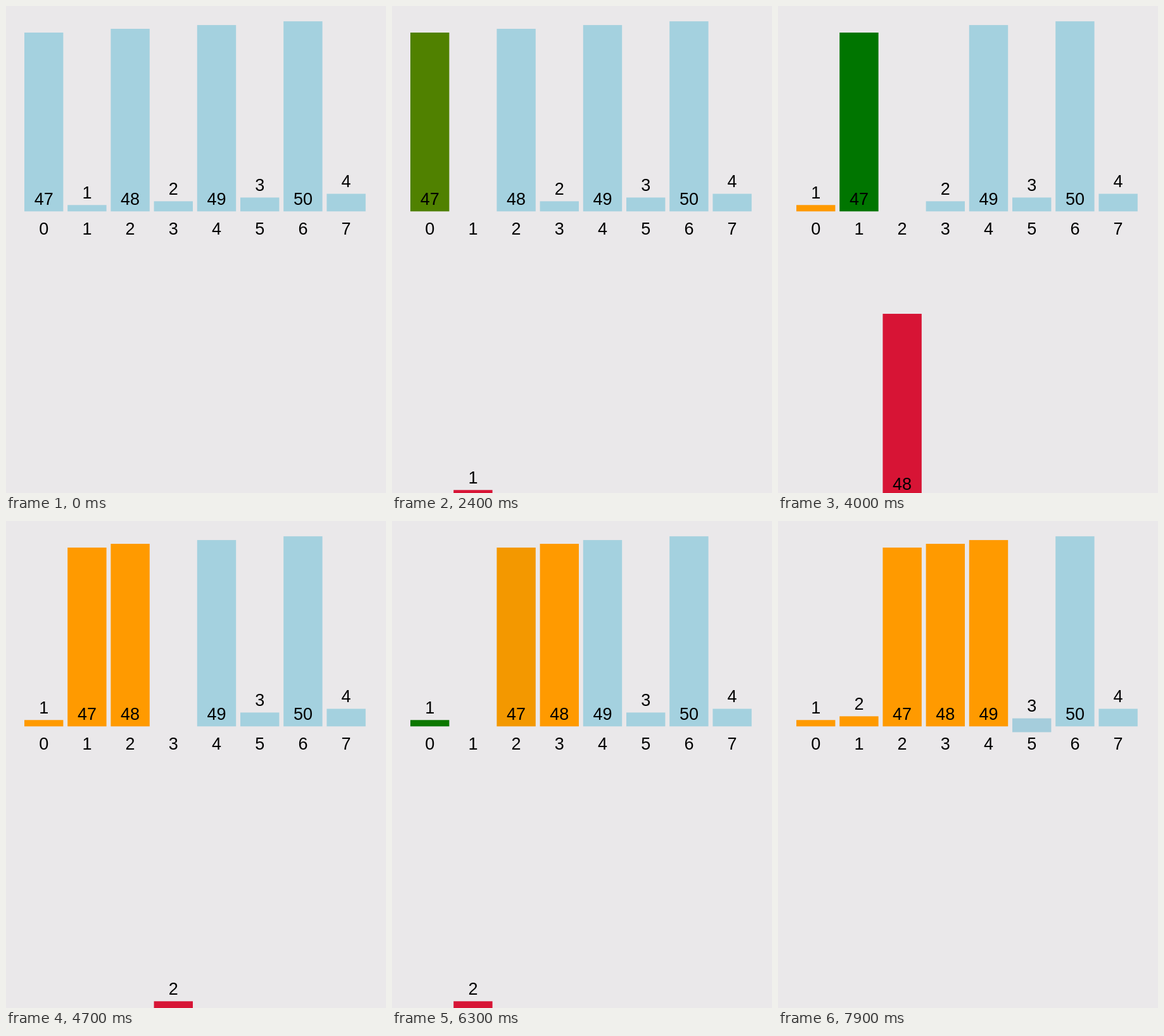
An HTML page that plays this animation: 600x769 px, repeating every 8000 ms.

```html
<!DOCTYPE html>
<html lang="en">
<head>
<meta charset="utf-8">
<title>Insertion sort</title>
<style>
  html, body { margin: 0; width: 100%; height: 100%; overflow: hidden; background: #eae8ea; }
  svg { display: block; width: 100%; height: 100%; }
  text { font: 27px "Liberation Sans", Arial, sans-serif; text-anchor: middle; fill: #000; }
</style>
</head>
<body>
<svg id="stage" viewBox="0 0 600 769"></svg>
<script>
const LOOP = 8000, TICK = 100;
const FIRST_STEP = 1557, STEP = 350, MOVE = 250;
const LEFT = 29, PITCH = 68.2, WIDTH = 61.4, BASE = 324.3, DROP = 450;
const BLUE = [164, 209, 223], ORANGE = [255, 154, 0], GREEN = [0, 117, 0], RED = [215, 20, 53];
const values = [47, 1, 48, 2, 49, 3, 50, 4];

const stage = document.getElementById("stage");
const slotX = slot => LEFT + PITCH * slot;
const barHeight = value => 4.1 + 5.92 * value;
const mix = (a, b, p) => a + (b - a) * p;
const ease = t => t < 0.5 ? 4 * t ** 3 : 1 - 4 * (1 - t) ** 3;

function add(tag, attrs, content = "") {
  const node = document.createElementNS("http://www.w3.org/2000/svg", tag);
  for (const name in attrs) node.setAttribute(name, attrs[name]);
  node.textContent = content;
  return stage.appendChild(node);
}

// Run the sort once, keeping a snapshot of every bar after each step.
function sortSteps() {
  const bars = values.map((value, slot) => ({ value, slot, drop: 0, color: BLUE }));
  const order = [...bars];
  const steps = [];
  const snap = () => steps.push(bars.map(bar => ({ ...bar })));
  const markSorted = end => order.slice(0, end).forEach(bar => bar.color = ORANGE);

  snap();
  markSorted(1);
  snap();
  for (let i = 1; i < order.length; i++) {
    const key = order[i];
    key.drop = DROP;
    key.color = RED;
    snap();
    for (let j = i - 1; j >= 0; j--) {
      const other = order[j];
      markSorted(i + 1);
      key.color = RED;
      other.color = GREEN;
      snap();
      if (other.value < key.value) break;
      [order[j], order[j + 1]] = [key, other];
      key.slot = j;
      other.slot = j + 1;
      snap();
    }
    markSorted(i + 1);
    key.drop = 0;
    snap();
  }
  return steps;
}

const steps = sortSteps();
const rects = values.map(v => add("rect", { width: WIDTH, height: barHeight(v) }));
const labels = values.map(v => add("text", {}, v));
values.forEach((_, i) => add("text", { x: slotX(i) + WIDTH / 2, y: 361 }, i));

function render(time) {
  const clock = (time - FIRST_STEP) / STEP;
  const index = Math.max(0, Math.min(steps.length - 1, Math.floor(clock) + 1));
  const elapsed = (clock - index + 1) * STEP;
  const p = index ? ease(Math.min(1, elapsed / MOVE)) : 1;
  const to = steps[index], from = steps[Math.max(0, index - 1)];

  values.forEach((value, i) => {
    const a = from[i], b = to[i];
    const height = barHeight(value);
    const x = slotX(mix(a.slot, b.slot, p));
    const bottom = BASE + mix(a.drop, b.drop, p);
    const color = a.color.map((c, k) => Math.round(mix(c, b.color[k], p)));
    rects[i].setAttribute("x", x);
    rects[i].setAttribute("y", bottom - height);
    rects[i].setAttribute("fill", `rgb(${color})`);
    labels[i].setAttribute("x", x + WIDTH / 2);
    labels[i].setAttribute("y", bottom - 10.6 - (height < 40 ? height : 0));
  });
}

const start = performance.now();
function frame() {
  const time = (performance.now() - start) % LOOP;
  render(Math.floor(time / TICK) * TICK);
  requestAnimationFrame(frame);
}
frame();
</script>
</body>
</html>
```
